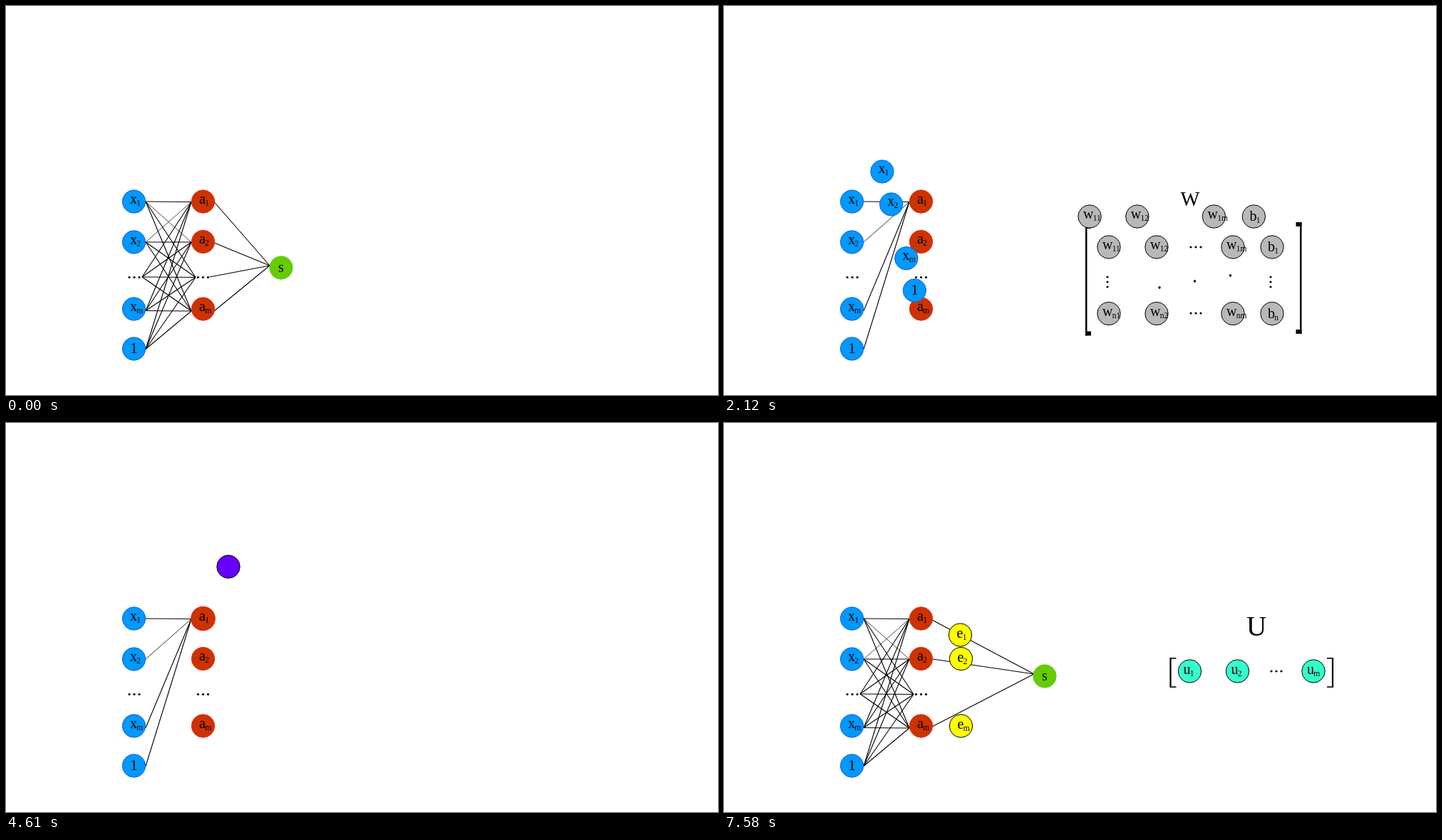
These frames come from a looping animation (999x547 px, 8000 ms). An HTML page with a canvas:

```html
<!DOCTYPE html>
<html lang="en">
<head>
<meta charset="utf-8">
<title>Neural network walk-through</title>
<style>
  html, body { margin: 0; width: 100%; height: 100%; overflow: hidden; background: #fff; }
  canvas { display: block; }
</style>
</head>
<body>
<canvas id="stage" width="999" height="547"></canvas>
<script>
const ctx = document.getElementById('stage').getContext('2d');
const LOOP = 8000, STEP = 77, R = 16.2;
const SERIF = '"Liberation Serif", "Times New Roman", serif';

// kind: [fill, border]
const PAINT = {
  input: ['#0099ff', '#0a5cf0'],
  hidden: ['#cc3300', '#e62a0c'],
  weight: ['#b8b8b8', '#000'],
  score: ['#66cc00', '#5fd02e'],
  product: ['#ccff99', '#00ff00'],
  sum: ['#6600ff', '#000'],
  error: ['#ffff00', '#000'],
  out: ['#33ffcc', '#000']
};

// letter: [x offset, baseline offset] from the node centre
const OFFSET = { x: [-5.5, 2.5], a: [-5.5, 2.5], w: [-9, 3], b: [-6, 6], e: [-5, 4], u: [-9, 4] };

const INPUTS = [['x', '1', 275], ['x', '2', 332], ['x', 'm', 426], ['1', '', 482]];
const COLS = [540, 607, 714, 769];
const TOP_COLS = [400, 466, 576, 636];
const WEIGHTS = [['w', '11'], ['w', '12'], ['w', '1m'], ['b', '1']];
const WEIGHTS_LAST = [['w', 'n1'], ['w', 'n2'], ['w', 'nm'], ['b', 'n']];

const mix = (a, b, p) => a + (b - a) * p;

function text(str, x, y, size, align = 'left') {
  ctx.font = `${size}px ${SERIF}`;
  ctx.textAlign = align;
  ctx.fillStyle = '#000';
  ctx.fillText(str, x, y);
}

function line(x1, y1, x2, y2, width = 1.1) {
  ctx.strokeStyle = '#000';
  ctx.lineWidth = width;
  ctx.beginPath();
  ctx.moveTo(x1, y1);
  ctx.lineTo(x2, y2);
  ctx.stroke();
}

function dots(x, y, dx = 7, dy = 0, r = 1.6) {
  ctx.fillStyle = '#000';
  for (let i = -1; i <= 1; i++) {
    ctx.beginPath();
    ctx.arc(x + i * dx, y + i * dy, r, 0, 7);
    ctx.fill();
  }
}

function node(kind, x, y, letter = '', sub = '', r = R) {
  const [fill, border] = PAINT[kind];
  ctx.save();
  ctx.translate(x, y);
  ctx.scale(r / R, r / R);
  ctx.beginPath();
  ctx.arc(0, 0, R, 0, 7);
  ctx.fillStyle = fill;
  ctx.fill();
  ctx.strokeStyle = border;
  ctx.lineWidth = 1;
  ctx.stroke();
  if (sub) {
    const [dx, dy] = OFFSET[letter];
    text(letter, dx, dy, 20);
    const end = dx + ctx.measureText(letter).width - 0.7;
    text(sub, end, dy + 3, 11.5);
  } else if (letter) {
    text(letter, 0, 5.7, 20, 'center');
  }
  ctx.restore();
}

function layers(r1 = R, rest = R) {
  for (const [letter, sub, y] of INPUTS) node('input', 179.5, y, letter, sub);
  dots(180, 381.5);
  dots(276.5, 381.5);
  node('hidden', 276.5, 275, 'a', '1', r1);
  node('hidden', 276.5, 331.5, 'a', '2', rest);
  node('hidden', 276.5, 426, 'a', 'm', rest);
}

function allLinks() {
  const from = [[196, 275], [196, 332], [191, 381], [196, 428.5], [196, 482.5]];
  const to = [[260, 275.5], [260, 332], [266, 381.5], [260, 429]];
  from.forEach(([x, y], i) => to.forEach(([u, v], j) =>
    line(x, y, u, v, i + j === 1 ? 0.7 : 1.1)));
}

function firstLinks() {
  [275, 332, 428.5, 482.5].forEach((y, i) => line(196, y, 260, 275.5, i === 1 ? 0.8 : 1.1));
}

function bracket(x, top, bottom, dir) {
  ctx.fillStyle = '#000';
  ctx.fillRect(dir > 0 ? x : x - 2.5, top, 2.5, bottom - top);
  const left = dir > 0 ? x : x - 8;
  ctx.fillRect(left, top, 8, 6);
  ctx.fillRect(left, bottom - 6, 8, 6);
}

function weightMatrix() {
  text('W', 654, 281, 28.5, 'center');
  bracket(507, 307, 463.5, 1);
  bracket(810.5, 304, 461, -1);
  COLS.forEach((x, i) => {
    node('weight', x, 339, ...WEIGHTS[i]);
    node('weight', x, 432.5, ...WEIGHTS_LAST[i]);
  });
  dots(662, 339);
  dots(662, 432);
  dots(538, 388, 0, 7);
  dots(767, 388, 0, 7);
  for (const [x, y] of [[611, 396], [660.5, 387], [710.5, 379]]) dots(x, y, 0, 0, 1.4);
}

function flyingNodes(p) {
  COLS.forEach((x, i) =>
    node('weight', mix(x, TOP_COLS[i], p), mix(339, 115.5, p), ...WEIGHTS[i]));
  INPUTS.forEach(([letter, sub, y], i) =>
    node('input', mix(179.5, TOP_COLS[i], p), mix(y, 56, p), letter, sub));
}

function plus(x, y) {
  line(x - 7, y, x + 7, y, 1.3);
  line(x, y - 7, x, y + 7, 1.3);
}

function products() {
  flyingNodes(1);
  dots(520, 64, 7.5);
  dots(524, 117.5, 7.5);
  TOP_COLS.forEach((x, i) => {
    text('*', x + 1, 100, 28, 'center');
    const ex = x - [3, 2, 1, 0][i], ey = i < 2 ? 151 : 154;
    for (const d of [-2, 2]) line(ex + d, ey - 4.5, ex + d, ey + 4.5, 0.9);
  });
  node('product', 400, 195, '1');
  node('product', 468, 196.5, '2');
  node('product', 574.5, 196.5, 'm');
  node('weight', 639, 196.5, 'b', '1');
  for (const x of [432.5, 502, 539, 606.5]) plus(x, 197);
  dots(520.5, 205, 7.5, 0, 1.8);
}

function outputVector() {
  text('U', 747, 298.5, 39, 'center');
  for (const [x, dir] of [[626.5, 1], [854, -1]]) {
    line(x, 330, x, 372, 2.2);
    line(x, 330.8, x + 8 * dir, 330.8, 1.6);
    line(x, 371.2, x + 8 * dir, 371.2, 1.6);
  }
  node('out', 653.5, 349, 'u', '1');
  node('out', 720.5, 349, 'u', '2');
  node('out', 827, 349, 'u', 'm');
  dots(775, 349);
}

function scoreLinks(all) {
  line(292, 277, 435, 353);
  if (!all) return;
  line(293, 332, 435, 353);
  line(292, 427, 435, 353);
}

// progress of a stepped tween, from 0 on its first step to 1 on its last
function steps(t, start, count = 11) {
  const k = Math.floor((t - start + 3) / STEP);
  return Math.max(0, Math.min(count - 1, k)) / (count - 1);
}

function draw(t) {
  ctx.fillStyle = '#fff';
  ctx.fillRect(0, 0, 999, 547);

  if (t < 500) {
    allLinks();
    for (const [x, y] of [[292, 275.5], [292, 333], [286, 381], [292, 429]]) line(x, y, 370, 365);
    layers();
    node('score', 386, 368, 's');
  } else if (t < 4610) {
    firstLinks();
    layers();
    ctx.globalAlpha = mix(0.08, 1, steps(t, 500));
    weightMatrix();
    ctx.globalAlpha = 1;
    if (t >= 2820) products();
    else if (t >= 1970) flyingNodes(steps(t, 1970) * 0.9625);
    if (t >= 3750) {
      node('sum', 314.5, 197);
      line(346, 194.5, 360, 194.5, 1.3);
      line(346, 199.5, 360, 199.5, 1.3);
    }
  } else if (t < 5470) {
    const p = mix(0.065, 1, steps(t, 4610));
    firstLinks();
    node('sum', mix(314.5, 276.5, p), mix(197, 275, p));
    layers(mix(R, 26, p));
  } else if (t < 6330) {
    firstLinks();
    scoreLinks(false);
    layers(mix(26, R, steps(t, 5470)));
    node('score', 450, 356, 's');
  } else {
    const rest = t < 7180 ? mix(R + 0.5, 23, steps(t, 6330)) : mix(22, R, steps(t, 7180, 6));
    allLinks();
    scoreLinks(true);
    layers(R, rest);
    node('score', 450, 356, 's');
    if (t >= 7180) {
      node('error', 331.5, 298, 'e', '1');
      node('error', 332.5, 331.5, 'e', '2');
      node('error', 332.5, 426, 'e', 'm');
      outputVector();
    }
  }
}

const begin = performance.now();
function frame() {
  draw((performance.now() - begin) % LOOP);
  requestAnimationFrame(frame);
}
frame();
</script>
</body>
</html>
```
